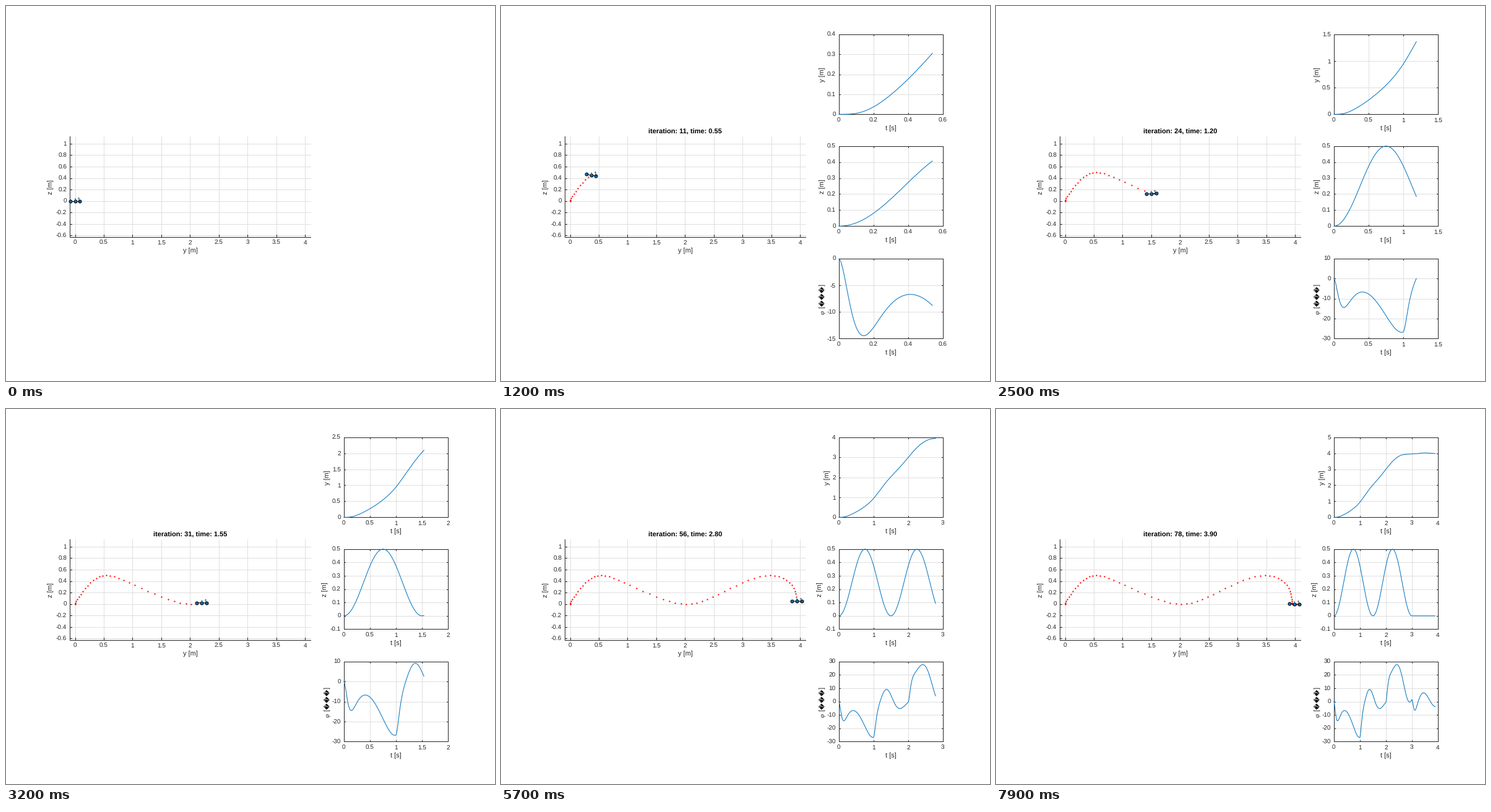
Recreate the animation shown at these times as a matplotlib script. Size 790x607 px, loop 8 s.

```python
import numpy as np
import matplotlib
import matplotlib.pyplot as plt
from matplotlib.animation import FuncAnimation

matplotlib.rcParams.update({
    "font.family": ["Liberation Sans", "DejaVu Sans"],
    "text.hinting": "none",
})

W, H, DPI = 790, 607, 100
PX = 72 / DPI
SHIFT = 0.7
FRAMES, INTERVAL = 80, 100
STEP = 0.05
ARM, MAST = 0.086, 0.04
BLUE, INK, GRID = "#0072bd", "#262626", "#dfdfdf"

fig = plt.figure(figsize=(W / DPI, H / DPI), dpi=DPI, facecolor="white")
ax = fig.add_axes([0, 0, 1, 1])
ax.set(xlim=(SHIFT, W + SHIFT), ylim=(H + SHIFT, SHIFT))
ax.axis("off")


# ---- flight: a planar craft steered by a cascaded PD controller ---------
G = 9.81
KP_Y, KD_Y = 38, 3.9
KP_ROLL, KD_ROLL = 770, 37
WAVE = 2 * np.pi / 1.5
LAG = 0.003


def pos_z(t):
    p = np.clip(t - LAG, 0, 3)
    return .25 * (1 - np.cos(WAVE * p)) - .001 * np.clip(t - 1, 0, .5)


def goal(t):
    """Speed up, cruise, brake, hold: wanted place, speed, acceleration."""
    a, b, c = (min(max(t - k, 0), 1) for k in range(3))
    acc = 2 if t < 1 else -2 if 2 <= t < 3 else 0
    return a * a + 2 * b + 2 * c - c * c, 2 * a - 2 * c, acc


def fly(end=4.0, dt=0.001):
    times = np.arange(round(end / dt) + 1) * dt
    y = vy = phi = rate = 0.0
    log = []
    for t in times:
        log.append((y, np.degrees(phi)))
        place, speed, acc = goal(t)
        want = -(acc + KD_Y * (speed - vy) + KP_Y * (place - y)) / G
        rate += dt * (KP_ROLL * (want - phi) - KD_ROLL * rate)
        lift = .25 * WAVE ** 2 * np.cos(WAVE * (t - LAG)) if t < 3 else 0
        vy -= dt * (G + lift) * np.tan(phi)
        phi += dt * rate
        y += dt * vy
    return times, *np.array(log).T


TIMES, SIDE, TILT = fly()


def pos_y(t):
    return np.interp(t, TIMES, SIDE)


def roll(t):
    return np.interp(t, TIMES, TILT)


# ---- drawing helpers ---------------------------------------------------
def line(x, y, color=INK, w=1.0, z=2, **kw):
    return ax.plot(x, y, color=color, lw=w * PX, zorder=z, **kw)[0]


def text(x, y, s, size=10, ha="center", rot=0, color=INK, **kw):
    return ax.text(x, y, s, fontsize=size * PX, ha=ha, va="baseline",
                   rotation=rot, rotation_mode="anchor", color=color, **kw)


def sx(y):
    return 112.2 + 92.9 * y


def sz(z):
    return 316.4 - 92.9 * z


def scene():
    for v in np.arange(0, 4.1, .5):
        x = sx(v)
        line([x, x], [211.5, 374.5], GRID, z=1)
        line([x, x], [370.5, 374.5])
        text(x, 386.9, f"{v:g}")
    for i in range(-3, 6):
        y = sz(i / 5)
        line([103.5, 492.5], [y, y], GRID, z=1)
        line([103.5, 107], [y, y])
        text(98.9, y + 3.6, f"{i / 5:g}", ha="right")
    line([103.5, 103.5, 492.5], [211.5, 374.5, 374.5])
    text(298.4, 400, "y [m]", 11)
    text(76, 293.3, "z [m]", 11, rot=90)


def nice(lo, hi, most):
    """Ticks on whole steps, using at most the given number of steps."""
    for e in range(-6, 3):
        for m in (1, 2, 5):
            s = m * 10.0 ** e
            a, b = int(np.floor(lo / s + 1e-6)), int(np.ceil(hi / s - 1e-6))
            if b - a <= most:
                return s * np.arange(a, b + 1)


def width(s):
    return 10 * sum({".": .278, "-": .333}.get(c, .556) for c in s)


def label(v):
    return f"{round(v, 6) + 0:g}"


def roll_label(x):
    parts = [text(x, 496.3, "φ", 11, rot=90, family="Liberation Serif", style="italic"),
             text(x, 488, "[", 11, rot=90),
             text(x, 452.5, "]", 11, rot=90)]
    parts += [text(x, 481.3 - 11 * i, "\ufffd", 10, rot=90, family="DejaVu Sans",
                   color="black") for i in range(3)]
    return parts


def chart(top, t, v, name):
    left, right, bottom = 546.5, 714.5, top + 129.5
    tx = nice(0, t[-1], 4)
    ty = nice(v.min(), v.max(), 6)

    def fx(a):
        return left + (right - left) * a / tx[-1]

    def fy(a):
        return bottom - (bottom - top) * (a - ty[0]) / (ty[-1] - ty[0])

    out = []
    for a in tx:
        x = fx(a)
        out += [line([x, x], [top, bottom], GRID, z=1),
                line([x, x], [bottom, bottom - 2]), line([x, x], [top, top + 2]),
                text(x, bottom + 12.8, label(a))]
    power = 0
    if 0 < ty[-1] < .0099:
        power = int(np.floor(np.log10(ty[-1]) + 1e-6))
        out += [text(left, top - 3.5, "×10", ha="left"),
                text(left + 17.3, top - 8.5, str(power), 8, "left")]
    names = [label(a / 10.0 ** power) for a in ty]
    for a, s in zip(ty, names):
        y = fy(a)
        out += [line([left, right], [y, y], GRID, z=1),
                line([left, left + 2], [y, y]), line([right, right - 2], [y, y]),
                text(541.5, y + 3.6, s, ha="right")]
    out += [line([left, right, right, left, left], [top, top, bottom, bottom, top]),
            line(fx(t), fy(v), BLUE, z=3),
            text(630.8, bottom + 26.2, "t [s]", 11)]
    x = 537 - max(map(width, names))
    out += [text(x, top + 64.8, name, 11, rot=90)] if name else roll_label(x + .5)
    return out


def vehicle(k):
    trail = STEP * np.arange(k + 1)
    t = k * STEP
    x, y, a = sx(pos_y(t)), sz(pos_z(t)), np.radians(roll(t))
    arm, mast = 92.9 * ARM, 92.9 * MAST
    d = arm * np.array([-1, 0, 1])
    tip = x - mast * np.sin(a), y - mast * np.cos(a)
    return [
        line(sx(pos_y(trail)), sz(pos_z(trail)), "red", z=4, ls="none", marker="o",
             ms=2.3 * PX, mew=0),
        line(x + d * np.cos(a), y - d * np.sin(a), "black", z=5, marker="o",
             ms=5 * PX, mfc=BLUE, mec="black", mew=PX),
        line([x, tip[0]], [y, tip[1]], BLUE, 1.5, z=6),
        text(tip[0] + 2.8, tip[1] + 5.2, "1", ha="left", zorder=7),
    ]


# ---- animation ---------------------------------------------------------
live = []


def update(k):
    while live:
        live.pop().remove()
    live.extend(vehicle(k))
    if k > 0:
        s = f"iteration: {max(k - 1, 1)}, time: {(k - 1) * STEP:.2f}"
        live.append(text(298.2, 206.7, s, 11, color="black", weight="bold"))
    if k > 1:
        t = .01 * np.arange((k - 1) * 5)
        live.extend(chart(46.5, t, pos_y(t), "y [m]"))
        live.extend(chart(227.5, t, pos_z(t), "z [m]"))
        live.extend(chart(409.5, t, roll(t), ""))
    return live


scene()
anim = FuncAnimation(fig, update, frames=FRAMES, interval=INTERVAL,
                     repeat=True, repeat_delay=0, blit=False)
plt.show()
```
